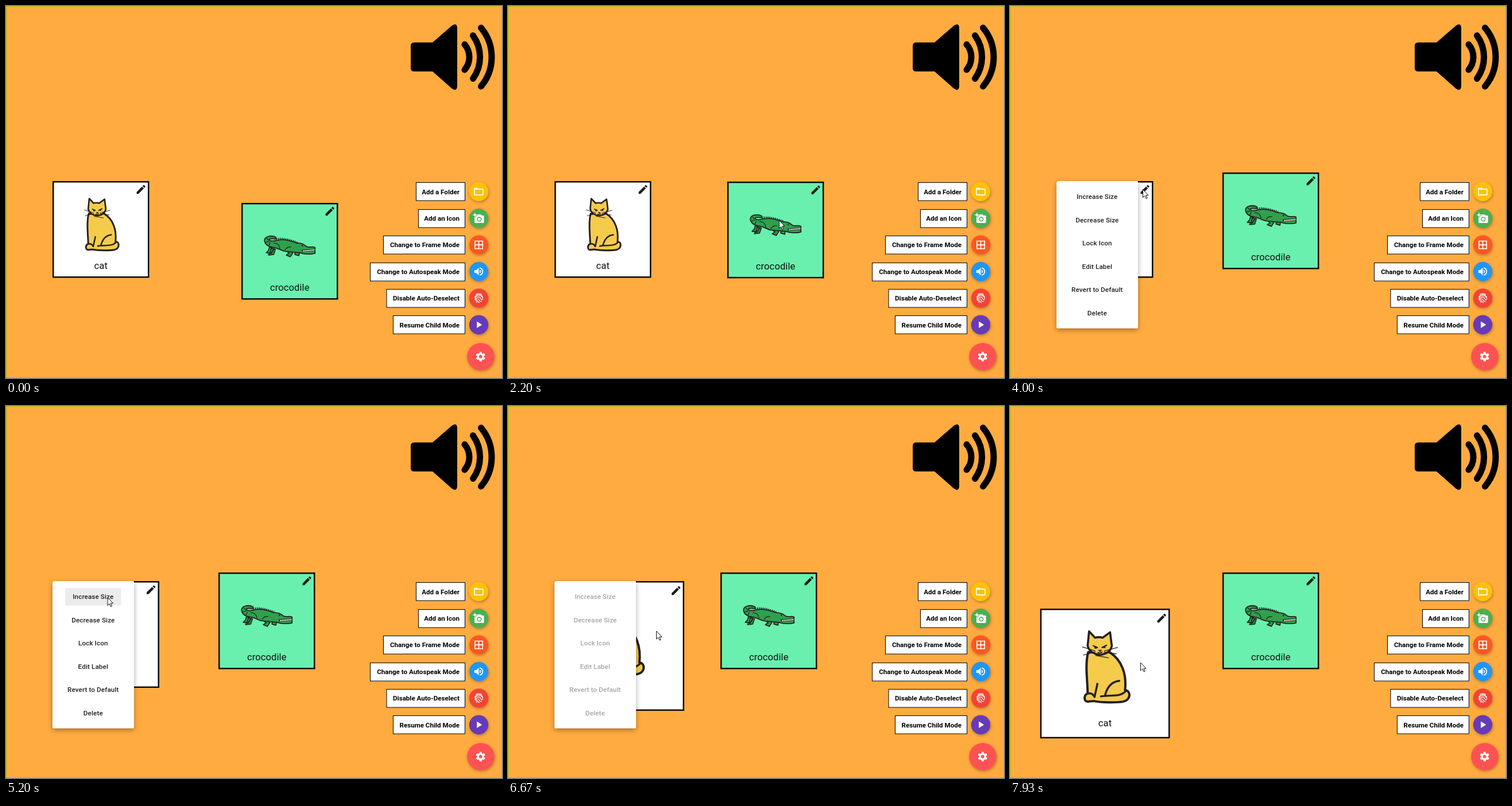
Write an HTML page that moves like this. It is 864 px wide and 648 px high and loops after 8000 ms.

```html
<!DOCTYPE html>
<html lang="en">
<head>
<meta charset="utf-8">
<title>Icon board</title>
<style>
  html, body { margin: 0; width: 100%; height: 100%; overflow: hidden; background: #ffab40; }
  svg { display: block; }
  text { font-family: Roboto, Arial, sans-serif; fill: #111; }
  .name { font-size: 16.6px; letter-spacing: .08px; text-anchor: middle; }
  .tip { font-size: 11.6px; font-weight: 700; text-anchor: end; fill: #000; }
  .item { font-size: 11.7px; font-weight: 500; letter-spacing: .1px; text-anchor: middle; fill: #212121; }
  .fab { filter: drop-shadow(1px 2.5px 2.5px rgba(0, 0, 0, .3)); }
  .ink { fill: none; stroke: #231f20; stroke-linecap: round; stroke-linejoin: round; }
  #menu > rect:first-child { filter: drop-shadow(0 3px 4px rgba(0, 0, 0, .35)); }
</style>
</head>
<body>
<svg id="stage" width="864" height="648" viewBox="0 0 864 648">
  <defs>
    <path id="pencil" d="M20.7 7c.4-.4.4-1 0-1.4l-2.3-2.3c-.4-.4-1-.4-1.4 0l-1.9 1.8 3.8 3.8zM3 17.25V21h3.75L17.8 9.9 14.1 6.2z" transform="scale(.85) translate(-12 -12)" fill="#1c1c1c"/>
    <!-- both animals are drawn around their own centre -->
    <g id="catArt" transform="scale(.732) translate(-166 -454.5)">
      <g class="ink" stroke-width="4">
        <path fill="#f5cb4b" d="M135 429C129 452 134 478 134 501C127 503 127 515 134 515L144 514C160 517 184 517 196 515C209 512 210 497 199 495C202 468 194 443 172 429Z"/>
        <path fill="#f5cb4b" stroke-width="3.6" d="M136.500 393L147 404Q154 402 160 404L173 394.500L176 418Q174 431 155 434Q137 431 134 418Z"/>
        <path stroke-width="3.4" d="M189 479Q170 481 164 505M151 484L146 507M134 501Q142 499 146 507M157 506C172 503 190 508 200 497"/>
      </g>
      <g class="ink" stroke-width="1.3">
        <path d="M147 427L125 420M147 429L127 434M163 427L186 421M163 429L184 432M148 435L170 439"/>
        <path stroke-width="2.200" d="M144 418L151 421M159 421L167 417M152 430Q155 432 159 429"/>
      </g>
      <path fill="#231f20" d="M152 425h7l-3.500 4zM146 420h4v3h-4zM161 419h4v3h-4z"/>
    </g>
    <g id="crocArt" transform="translate(-494 -418.500)">
      <g class="ink" stroke-width="1.8">
        <path fill="#2fa04b" d="M459 419L457 426L453 430L462 431L466 424ZM462 422L460 430L457 434L466 433L469 424ZM486 425L493 431L488 434L495 437L499 431L496 424ZM504 427L503 433L510 435L511 427Z"/>
        <path fill="#2fa04b" d="M470 403C462 399 450 401 450 409C451 417 460 420 467 421C475 422 480 428 490 428L512 430C520 433 531 433 538 431L538 421C533 418 529 422 523 419C518 414 513 413 506 413C496 409 484 406 473 408C466 410 460 411 458 407C461 404 466 406 470 406Z"/>
        <path stroke-width="1.200" d="M466 413Q476 413 477 423M486 425Q490 419 496 420M454 405L457 408M452 412L458 410M460 412L458 417"/>
      </g>
      <path fill="none" stroke="#231f20" stroke-width="3" stroke-dasharray="1.600 1.700" d="M470 406C484 404 496 408 507 412"/>
      <path fill="none" stroke="#231f20" stroke-width="4" d="M515 427L538 425"/>
      <path fill="none" stroke="#fff" stroke-width="2.200" stroke-dasharray="1.800 .8" d="M517 427L538 425"/>
      <circle cx="516" cy="418" r="1.300" fill="#231f20"/>
    </g>
  </defs>

  <rect width="864" height="648" fill="#ffab40"/>
  <rect x=".5" y=".5" width="863" height="647" fill="none" stroke="#abc51a"/>

  <path d="M711 63.500H743L777 34Q786 28 786 39V138Q786 150 777 144L743 114H711Q705 114 705 108V69.500Q705 63.500 711 63.500Z"/>
  <path fill="none" stroke="#000" stroke-width="11" stroke-linecap="round" d="M799 67A34 34 0 0 1 799 111M813.500 51.500A64 64 0 0 1 813.500 126.500M827.500 38A79.500 79.500 0 0 1 827.500 140"/>

  <g id="tools"></g>
  <g id="cat"></g>
  <g id="croc"></g>
  <g id="menu"></g>
  <path id="cursor" d="M.5.5V14.500L3.700 11.600L6.100 16.600L8.100 15.700L5.800 10.800H10Z" fill="#fff" stroke="#111" stroke-width="1"/>
</svg>
<script>
const $ = id => document.getElementById(id);
const move = (x, y) => `translate(${x} ${y})`;

const line = 'fill="none" stroke="#fff" stroke-width="1.4" stroke-linecap="round"';
const solid = 'fill="#fff" fill-rule="evenodd"';
const tools = [
  ['Add a Folder', 714, '#ffc107', solid, 'M20 18H4V8h16zM20 6h-8l-2-2H4a2 2 0 0 0-2 2v12a2 2 0 0 0 2 2h16a2 2 0 0 0 2-2V8a2 2 0 0 0-2-2z'],
  ['Add an Icon', 718, '#4caf50', solid, 'M3 4V1h2v3h3v2H5v3H3V6H0V4zM6 10V7h3V4h7l1.800 2H21a2 2 0 0 1 2 2v12a2 2 0 0 1-2 2H5a2 2 0 0 1-2-2V10zM13 19a5 5 0 0 0 0-10a5 5 0 0 0 0 10zM13 17.200a3.200 3.200 0 0 1 0-6.400a3.200 3.200 0 0 1 0 6.400z'],
  ['Change to Frame Mode', 657, '#ff5722', solid, 'M3 3v18h18V3zM11 19H5v-6h6zM11 11H5V5h6zM19 19h-6v-6h6zM19 11h-6V5h6z'],
  ['Change to Autospeak Mode', 634, '#2196f3', solid, 'M3 9v6h4l5 5V4L7 9zM16.500 12a4.500 4.500 0 0 0-2.500-4v8a4.500 4.500 0 0 0 2.500-4zM14 3.200v2.100a7 7 0 0 1 0 13.400v2.100a9 9 0 0 0 0-17.600z'],
  ['Disable Auto-Deselect', 662.500, '#f44336', line, 'M6 4Q12 1 18 4M3.500 9.500Q12-.5 20.500 9.500M4.500 16Q3 7 12 7Q21 7 20 14Q18.500 17 16.500 14Q16 10 12 10Q7 10 8 15Q9 19 13 21.500M8.500 21Q4 15 6 11M12 13Q12 19 18 19'],
  ['Resume Child Mode', 674, '#673ab7', solid, 'M8 5v14l11-7z'],
];

$('tools').innerHTML = tools.map(([label, left, color, paint, icon], i) => {
  const y = 323.300 + i * 46.400;
  return `<rect x="${left + .5}" y="${Math.round(y - 16) + .5}" width="${799 - left}" height="31.500" fill="#fff" stroke="#000"/>
    <text class="tip" x="790" y="${y + 4.200}">${label}</text>
    <circle class="fab" cx="823.500" cy="${y}" r="16.700" fill="${color}"/>
    <path ${paint} d="${icon}" transform="${move(823.500, y)} scale(.83) translate(-12 -12)"/>`;
}).join('') + `<circle class="fab" cx="827" cy="610.700" r="23.800" fill="#ff5252"/>
  <g transform="translate(826.700 610.700)" fill="none" stroke="#fff">
    <circle r="4.600" stroke-width="3.400"/>` +
  [0, 60, 120].map(a => `<path d="M0-8.200V-5M0 8.200V5" stroke-width="4" transform="rotate(${a})"/>`).join('') + '</g>';

const items = ['Increase Size', 'Decrease Size', 'Lock Icon', 'Edit Label', 'Revert to Default', 'Delete'];
$('menu').innerHTML = `<rect x="81" y="305" width="142" height="256.500" rx="1.700" fill="#fff"/>
  <rect id="press" x="103" y="317" width="97.500" height="30.500" rx="1.700" fill="#ececec"/>
  <g id="items">` + items.map((s, i) =>
    `<text class="item" x="151.800" y="${336.200 + i * 40.500}">${s}</text>`).join('') + '</g>';

function card(id, fill, label) {
  const g = $(id);
  g.innerHTML = `<rect x="1.250" y="1.250" fill="${fill}" stroke="#0a0a0a" stroke-width="2.500"/>
    <use href="#${id}Art"/><use href="#pencil"/><text class="name">${label}</text>`;
  const [box, art, pencil, text] = g.children;
  return (x, y, size, artX, artY) => {
    const grow = size - 168.500;
    g.setAttribute('transform', move(x, y));
    box.setAttribute('width', size - 2.500);
    box.setAttribute('height', size - 2.500);
    art.setAttribute('transform', `${move(artX * size, artY * size)} scale(${1 + grow * .00642})`);
    pencil.setAttribute('transform', move(size - 14.300, 14.500 + grow * .035));
    text.setAttribute('x', size / 2);
    text.setAttribute('y', size - 15.200 - grow * .1);
  };
}
const drawCat = card('cat', '#fff', 'cat');
const drawCroc = card('croc', '#69f0ae', 'crocodile');

// Keys are [tick, values...], at 15 ticks per second.
const cursorKeys = [[22, 797.500, 234], [30, 500, 410], [34, 462.500, 360.500], [35, 460, 357], [37, 460, 357],
  [47, 238, 320], [48, 237, 320], [49, 231, 319], [64, 231, 319], [69, 176.500, 333], [87, 176.500, 333],
  [93, 262, 392], [98, 262, 392], [99, 258, 391.500], [109, 258, 391.500], [112, 245.500, 406], [119, 227, 446.500]];
const crocKeys = [[30, 410, 343], [34, 372.500, 293.500], [35, 370, 290]];
const catKeys = [[109, 81, 305], [112, 70, 318], [119, 52.500, 353]];
const sizeKeys = [[72, 168.500], [76, 186], [79, 186], [82, 205.500], [84, 205.500], [85, 216], [87, 226]];

function at(keys, n) {
  const i = keys.findIndex(k => k[0] > n);
  if (i === 0) return keys[0].slice(1);
  if (i < 0) return keys[keys.length - 1].slice(1);
  const a = keys[i - 1], b = keys[i], p = (n - a[0]) / (b[0] - a[0]);
  return a.slice(1).map((v, j) => v + (b[j + 1] - v) * p);
}

function draw(n) {
  const show = (id, on) => $(id).setAttribute('visibility', on ? 'visible' : 'hidden');
  drawCroc(...at(crocKeys, n), 168.500, .5, .447);
  drawCat(...at(catKeys, n), ...at(sizeKeys, n), .508, .448);

  const open = 1 - (1 - Math.min(1, Math.max(0, (n - 56) / 4))) ** 3;
  show('menu', n > 56 && n < 102);
  show('press', n > 72 && n < 88);
  $('menu').setAttribute('opacity', open);
  $('menu').setAttribute('transform', `translate(223 305) scale(${open}) translate(-223 -305)`);
  $('items').setAttribute('opacity', Math.min(1, Math.max(0, (102 - n) / 5)));

  show('cursor', n > 21);
  $('cursor').setAttribute('transform', move(...at(cursorKeys, n)));
}

function tick() {
  draw(Math.floor((performance.now() % 8000 + 4) * 15 / 1000) % 120);
  requestAnimationFrame(tick);
}
tick();
</script>
</body>
</html>
```
